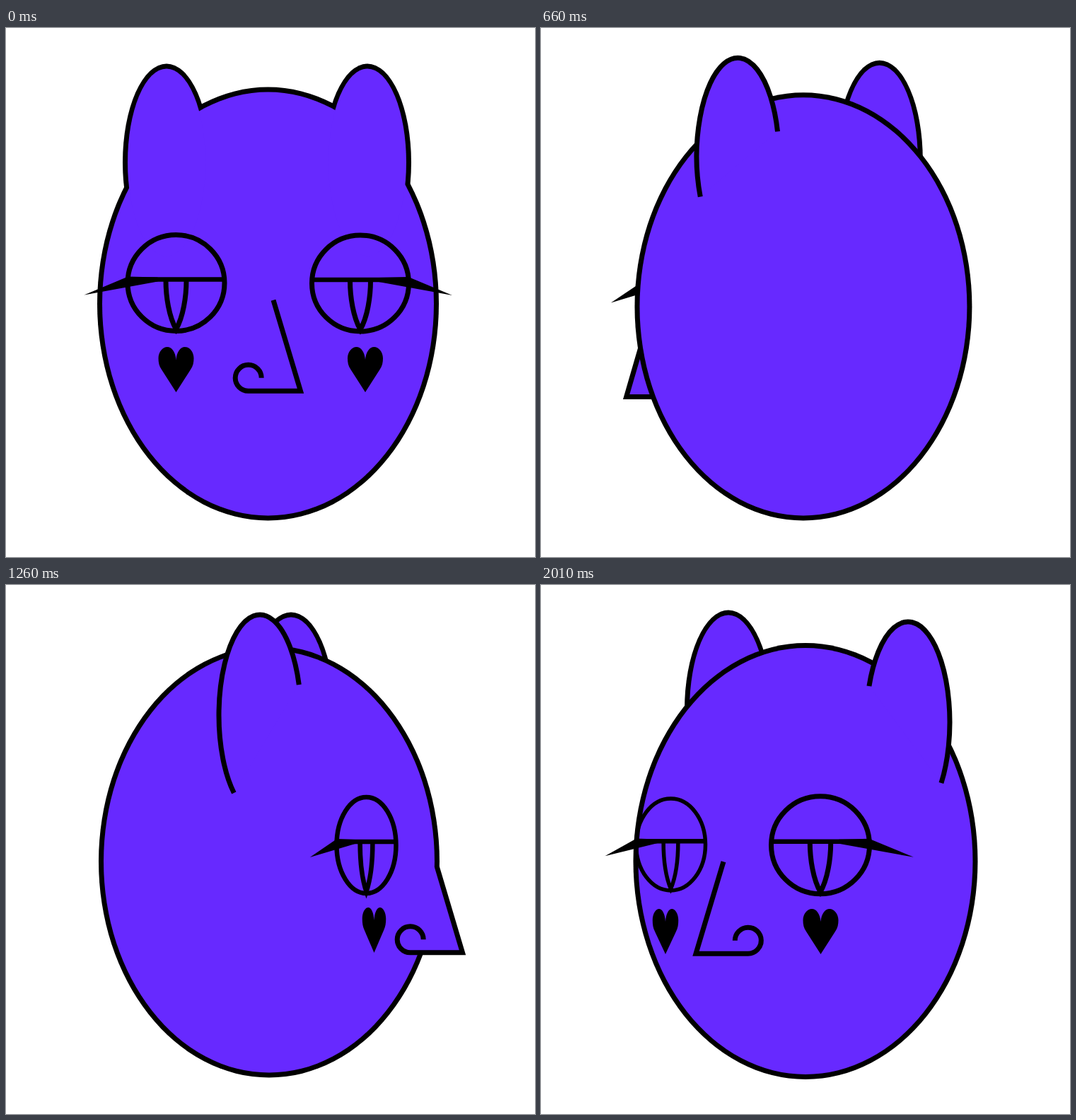
An HTML page that plays this animation: 748x748 px, repeating every 2160 ms.

```html
<!DOCTYPE html>
<html lang="en">
<head>
<meta charset="utf-8">
<title>Turning cat head</title>
<style>
html, body { margin: 0; width: 100%; height: 100%; overflow: hidden; background: #fff; }
svg { display: block; width: 100vw; height: 100vh; }
.line { fill: none; stroke: #000; stroke-width: 7; stroke-miterlimit: 10; }
.skin { fill: #6729ff; }
.eye * { vector-effect: non-scaling-stroke; }
</style>
</head>
<body>
<svg id="stage" viewBox="0 0 748 748"></svg>
<script>
const stage = document.getElementById('stage');
const LINE = 7;

const oval = ([cx, cy, rx, ry], grow, fill) =>
  `<ellipse cx="${cx}" cy="${cy}" rx="${rx + grow}" ry="${ry + grow}" fill="${fill}"/>`;

// Overlapping ovals merged into one outlined shape
const blob = (...ovals) =>
  ovals.map(o => oval(o, LINE / 2, '#000')).join('') +
  ovals.map(o => oval(o, -LINE / 2, '#6729ff')).join('');

// Ear with open ends at heights yl (left) and yr (right)
function ear(cx, cy, rx, ry, yl, yr) {
  const half = y => rx * Math.sqrt(1 - ((y - cy) / ry) ** 2);
  const d = `M${cx - half(yl)} ${yl}A${rx} ${ry} 0 1 1 ${cx + half(yr)} ${yr}`;
  return `<path class="line" style="fill:#6729ff" d="${d}"/>`;
}

// dir 1: lash points right, -1: left
function eye(cx, cy, rx, ry, dir, width = LINE) {
  const k = 68.5;
  return `<g class="eye" transform="translate(${cx} ${cy}) scale(${dir * rx / k} ${ry / k})">
    <g class="line" style="stroke-width:${width}">
      <circle r="${k}"/>
      <path style="stroke-width:6.5" d="M-68-5H68"/>
      <path d="M-14.5-4C-14.5 20-10 48 0 66C10 48 14.5 20 14.5-4"/>
    </g>
    <path d="M26-2V-8L68-9L130 17Z"/></g>`;
}

const heart = (cx, y, sx = 1) =>
  `<path transform="translate(${cx} ${y}) scale(${sx} 1)" d="M0 64L-20.5 32C-24 27-25 22-25 16
    C-25 7-19 0-12.5 0C-6 0-1 7 0 18C1 7 6 0 12.5 0C19 0 25 7 25 16C25 22 24 27 20.5 32Z"/>`;

// Nose drawn from the bridge offset (bx, by) to the tip at (x, y), then the nostril curl
const nose = (x, y, dir, bx, by) =>
  `<path class="line" transform="translate(${x} ${y}) scale(${dir} 1)"
    d="M${bx} ${by}L0 0H-74A18.5 18.5 0 1 1-55.3-18.5"/>`;

const frontHead = blob([370.5, 390, 238, 303], [227, 190, 58.5, 136], [511, 190, 58.5, 136]);

const front = frontHead +
  eye(240.5, 360.5, 68.5, 68, -1) + eye(501, 361, 68.5, 68, 1) +
  heart(240.5, 451) + heart(508, 451) +
  nose(416.5, 513.3, 1, -38.5, -128.5);

const quarter =
  blob([265, 176, 58.5, 137]) + blob([374, 390.5, 240, 305]) +
  ear(519, 194, 59, 142, 143, 280) +
  eye(183.5, 367, 49, 65, -1, 5.5) + eye(395, 367.7, 69.5, 69, 1) +
  heart(176, 458, 0.73) + heart(395.5, 458) +
  nose(219, 521.2, -1, -39, -130);

const side =
  blob([403, 178, 58, 136]) + blob([372, 391, 237.5, 302]) +
  ear(359, 184, 58, 142, 294, 141) +
  '<path class="skin" d="M560 399H609.5L645.5 520H560Z"/>' +
  eye(509.5, 368, 42, 68, -1, 6.5) + heart(520.5, 456, 0.67) +
  nose(645.5, 519.8, 1, -36.2, -121.5);

const rear =
  blob([263, 186, 57.5, 136]) +
  '<path d="M600 360.5L642 388.5L600 376Z"/>' +
  '<path class="line" style="fill:#6729ff" d="M590 417L620.3 521.3H570"/>' +
  blob([370.5, 394, 234.5, 298.5]) +
  ear(463, 182, 58, 139, 147, 239);

const place = (art, sx, sy, x, y) =>
  `<g transform="matrix(${sx} 0 0 ${sy} ${x} ${y})">${art}</g>`;

const poses = [
  place(front, 1, 1, 0, 0),
  place(quarter, -0.98, 0.979, 738.2, 10.7),
  place(side, 1, 1, 0, 0),
  place(rear, 1, 1, 0, 0),
  place(frontHead, 1.0166, 1.0166, -6.2, -10.1),
  place(rear, -1.002, 1.002, 742.2, -0.9),
  place(side, -1.0105, 1.0125, 748.9, -4.5),
  place(quarter, 1, 1, 0, 0)
];
stage.innerHTML = poses.join('');
const groups = [...stage.children];

// A short front view, then two full turns of seven held poses
const LOOP = 2160, INTRO = 60, HOLD = 150;

function draw(ms) {
  const t = ms % LOOP;
  const now = t < INTRO ? 0 : 1 + Math.floor((t - INTRO) / HOLD) % 7;
  groups.forEach((g, i) => g.style.display = i === now ? '' : 'none');
}

let start;
function tick(ms) {
  start ??= ms;
  draw(ms - start);
  requestAnimationFrame(tick);
}
draw(0);
requestAnimationFrame(tick);
</script>
</body>
</html>
```
